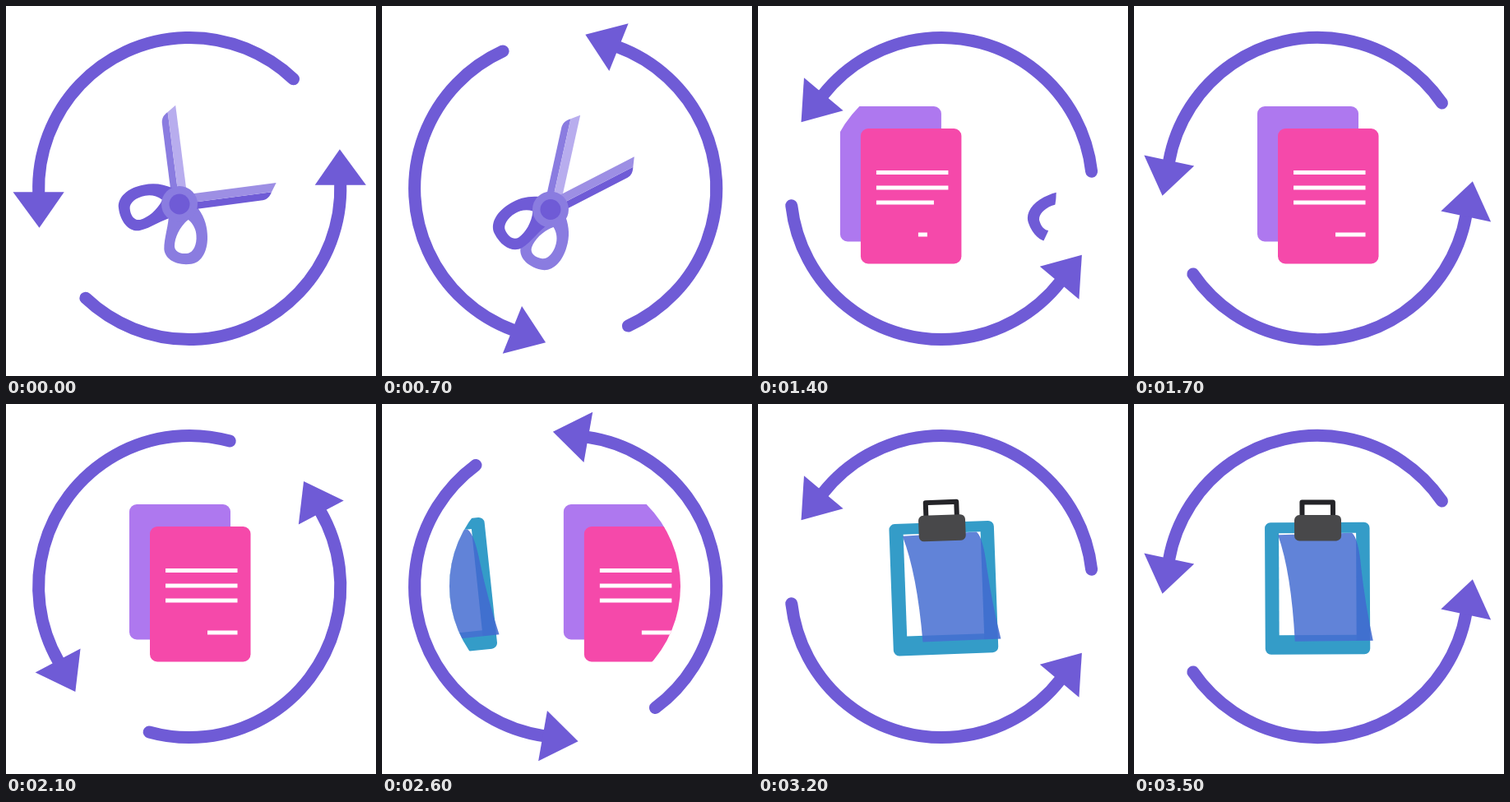
Write an HTML page with a canvas that moves like this. It is 450 px wide and 450 px high and loops after 3.6 s.

```html
<!DOCTYPE html>
<html lang="en">
<head>
<meta charset="utf-8">
<title>Cut, copy, paste</title>
<style>
html, body { margin: 0; width: 100%; height: 100%; overflow: hidden; background: #fff; }
canvas { display: block; width: 450px; height: 450px; }
</style>
</head>
<body>
<canvas id="stage"></canvas>
<script>
const canvas = document.getElementById('stage');
const ctx = canvas.getContext('2d');
const dpr = window.devicePixelRatio || 1;
canvas.width = canvas.height = 450 * dpr;

const CX = 223.2, CY = 222, RING = 183.6, LENS = 140.5;
const VIOLET = '#6f5bd6', LILAC = '#8a7ce0', PALE = '#b8adee';
const rad = d => d * Math.PI / 180;
const clamp = x => Math.max(0, Math.min(1, x));
const ease = x => (1 - Math.cos(Math.PI * clamp(x))) / 2;

const HANDLE = new Path2D(
  'M-5-20C-16-27-28-30-40-29C-60-28-74-18-74-5C-74 14-64 26-52 25.5C-38 24-24 16-8 14Z' +
  'M-20-8C-26-14-34-16-40-15.5C-52-15-60-9-60.5-3C-61 6-57 13-50 12.5C-40 11-28 4-20-8Z');
const EDGE = new Path2D('M0-10.5H120L113 0H0Z');
const SPINE = new Path2D('M0 0H113C110 5 107 8 101 8.5H0Z');
const PAGE = new Path2D('M175 159L265 157Q273 164 276 200Q281 246 290 288L195 288.5Q191 205 175 159Z');
const FOLD = new Path2D('M265 157Q273 164 276 200Q281 246 290 288L270 288V168Z');

function scoped(draw) {
  ctx.save();
  draw();
  ctx.restore();
}

function fill(path, color, rule) {
  ctx.fillStyle = color;
  ctx.fill(path, rule || 'nonzero');
}

function box(x, y, w, h, r, color) {
  ctx.fillStyle = color;
  ctx.beginPath();
  ctx.roundRect(x, y, w, h, r);
  ctx.fill();
}

function disc(r, color) {
  ctx.fillStyle = color;
  ctx.beginPath();
  ctx.arc(0, 0, r, 0, 2 * Math.PI);
  ctx.fill();
}

function arrow(turn) {
  scoped(() => {
    ctx.translate(CX, CY);
    ctx.rotate(-rad(turn));
    ctx.strokeStyle = ctx.fillStyle = VIOLET;
    ctx.lineWidth = 15;
    ctx.lineCap = 'round';
    ctx.beginPath();
    ctx.arc(0, 0, RING, rad(-46.5), rad(-182), true);
    ctx.stroke();
    ctx.beginPath();
    ctx.moveTo(-214.7, 4.3);
    ctx.lineTo(-152.5, 4.3);
    ctx.lineTo(-182.7, 47.8);
    ctx.fill();
  });
}

function blade(angle, flip, edge, spine) {
  scoped(() => {
    ctx.rotate(-rad(angle));
    ctx.scale(1, flip);
    fill(HANDLE, spine, 'evenodd');
    fill(SPINE, spine);
    fill(EDGE, edge);
  });
}

function scissors(k) {
  const half = 33.8 + 11.1 * Math.cos(2 * Math.PI * k / 28);
  const back = (44.9 - half) / 19.7;
  scoped(() => {
    ctx.translate(211 - 6 * back, 241 + 6.5 * back);
    blade(52.4 + half, -1, PALE, LILAC);
    blade(52.4 - half, 1, '#9d8fe4', VIOLET);
    disc(22, LILAC);
    disc(12.5, VIOLET);
  });
}

function papers(k) {
  box(150, 122, 123, 164.5, 9, '#ae78ef');
  box(175, 149, 122.5, 164.5, 9, '#f549aa');
  ctx.fillStyle = '#fff';
  [[194, 200], [194, 218.5], [194, 236.5], [245, 275.5]].forEach(([x, y], i) => {
    ctx.fillRect(x, y, (281.5 - x) * clamp((k - 24.2 - 3 * i) / 6), 5);
  });
}

function clipboard(k) {
  scoped(() => {
    ctx.translate(CX - .4, 140);
    ctx.rotate(rad(Math.min(0, -6 + (k - 65) * .26)));
    ctx.translate(.4 - CX, -140);
    box(159, 144, 127.5, 160.5, 7, '#349cc8');
    box(176, 157, 94, 124, 0, '#fff');
    fill(PAGE, 'rgba(70,110,210,.85)');
    fill(FOLD, 'rgba(50,95,200,.18)');
    ctx.strokeStyle = '#242428';
    ctx.lineWidth = 6;
    ctx.lineJoin = 'round';
    ctx.strokeRect(204.5, 119.5, 37.5, 20);
    box(195, 135, 57, 31.5, 6, '#48484a');
  });
}

function slid(dx, draw, k) {
  if (Math.abs(dx) > 232) return;
  scoped(() => {
    ctx.beginPath();
    ctx.arc(CX - .7, CY - .5, LENS, 0, 2 * Math.PI);
    ctx.clip();
    ctx.translate(dx, 0);
    draw(k);
  });
}

function render(now) {
  // ten pictures a second taken from 25 steps a second
  const k = Math.floor(Math.floor(now % 3600 / 100) * 2.5);
  ctx.setTransform(dpr, 0, 0, dpr, 0, 0);
  ctx.fillStyle = '#fff';
  ctx.fillRect(0, 0, 450, 450);

  const a = ease((k - 25.2) / 14), b = ease((k - 59.8) / 14);
  slid(243 * a, scissors, k);
  slid(243 * (a - 1) + 233.5 * b, papers, k);
  slid(233.5 * (b - 1), clipboard, k);

  arrow(4 * k);
  arrow(4 * k + 180);
}

let start;
function tick(now) {
  if (start === undefined) start = now;
  render(now - start);
  requestAnimationFrame(tick);
}
render(0);
requestAnimationFrame(tick);
</script>
</body>
</html>
```
